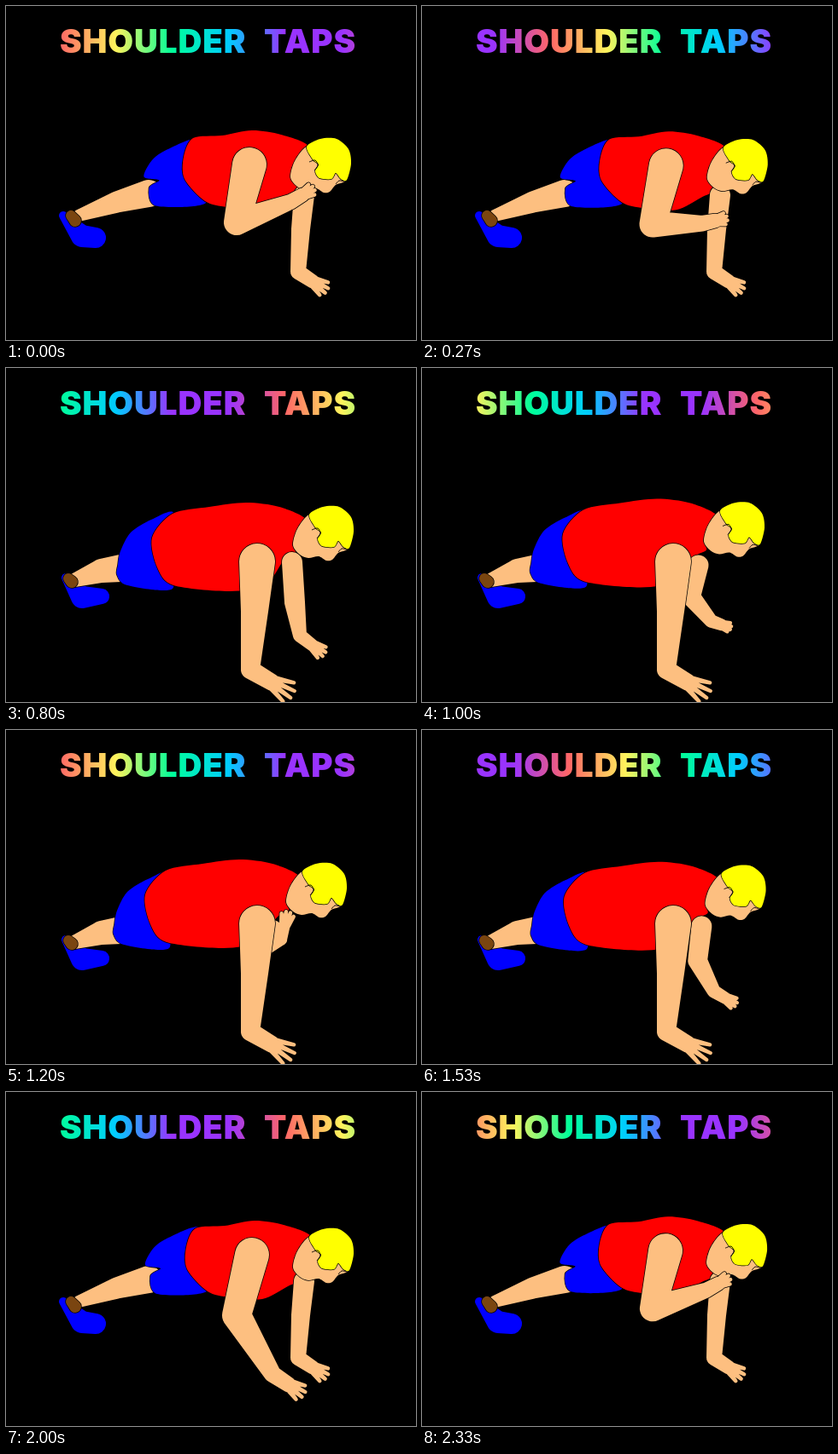
Animation of 480x392 px, one loop 2.39 s. Source, as an HTML page with a canvas:

```html
<!DOCTYPE html>
<html lang="en">
<head>
<meta charset="utf-8">
<title>Shoulder Taps</title>
<style>
html, body { margin: 0; width: 100%; height: 100%; overflow: hidden; background: #000; }
canvas { display: block; }
</style>
</head>
<body>
<canvas id="stage" width="480" height="392"></canvas>
<script>
const ctx = document.getElementById('stage').getContext('2d');
const LOOP = 2390, STEPS = 36, RAINBOW_WIDTH = 397;
const RAINBOW = ['#ff6666', '#fff35c', '#00ff99', '#00ccff', '#9933ff', '#9933ff'];
const SKIN = '#fdbf80', RED = '#f00', BLUE = '#00f', YELLOW = '#ff0', BROWN = '#7a4510';

// Outlines as [x, y], limbs as joints [x, y, radius] ending in a fingertip [x, y].
const torso = {
  open: [[222,160], [256,157], [291,151], [325,156], [357,170], [337,196], [352,216], [330,228], [300,243], [262,241], [236,234], [212,208], [211,182]],
  planted: [[195,169], [238,161], [281,156], [320,161], [352,177], [336,203], [339,216], [325,224], [304,252], [262,260], [196,253], [177,232], [171,197]]
};
const shorts = {
  open: [[226,159], [190,171], [172,184], [163,203], [181,207], [169,216], [177,237], [235,234], [222,200]],
  planted: [[196,169], [170,177], [146,192], [134,214], [131,230], [130,242], [142,254], [195,258], [186,215]]
};
const leg = {
  open: [[85,246,7], [130,230,12.5], [167,220,16]],
  planted: [[80,249,8], [112,238,14], [134,235,16]]
};
const shoe = {
  open: [[67,246,5], [89,270,13], [105,272,12]],
  planted: [[70,246,5], [89,269,13], [112,268,9]]
};
const sock = { open: [[76,246,6], [81,252,7]], planted: [[73,247,6], [77,251,7]] };
const nearArm = {
  open: [[288,191,20], [270,262,17], [312,331,10], [350,356]],
  planted: [[294,227,21], [291,285,16], [286,354,11], [337,384]],
  tap: [[285,186,20], [270,254,15], [333,230,9], [362,213]]
};
const farArm = {
  open: [[349,222,12], [345,262,11], [342,312,9], [377,335]],
  planted: [[335,228,12], [338,275,12], [344,314,8], [374,337]],
  tap: [[312,235,12], [292,262,10], [322,246,7], [331,212]]
};
const face = [[355,170], [373,175], [395,188], [401,209], [389,215], [382,223], [375,224], [366,219], [354,221], [344,217], [336,206], [341,187]];
const hair = [[355,170], [371,161], [390,161], [404,173], [407,190], [402,209], [395,208], [389,201], [384,208], [370,207], [365,199], [369,191], [362,185]];
const ear = [[358,188], [365,186], [368,192], [364,198]];
const brow = [[389,214], [393,210], [399,211]];

const ramp = (v, from, to) => Math.min(1, Math.max(0, (v - from) / (to - from)));
const easeOut = t => 1 - (1 - t) ** 2;
const mix = (a, b, t) => Array.isArray(a) ? a.map((v, i) => mix(v, b[i], t)) : a + (b - a) * t;
const move = (points, dx, dy) => points.map(([x, y]) => [x + dx, y + dy]);

function paint(path, color) {
  if (color) {
    ctx.lineWidth = 1.5;
    ctx.stroke(path);
    ctx.fillStyle = color;
    ctx.fill(path);
  } else {
    ctx.lineWidth = 0.9;
    ctx.stroke(path);
  }
}

function curve(points, closed) {
  const path = new Path2D(), n = points.length;
  const at = i => points[closed ? (i + n) % n : Math.min(n - 1, Math.max(0, i))];
  path.moveTo(...points[0]);
  for (let i = 0; i < n - !closed; i++) {
    const [a, b, c, d] = [-1, 0, 1, 2].map(k => at(i + k));
    path.bezierCurveTo(b[0] + (c[0] - a[0]) / 7, b[1] + (c[1] - a[1]) / 7,
      c[0] - (d[0] - b[0]) / 7, c[1] - (d[1] - b[1]) / 7, ...c);
  }
  return path;
}

function addBone(path, [x1, y1, r1], [x2, y2, r2]) {
  const angle = Math.atan2(y2 - y1, x2 - x1);
  const side = Math.acos(Math.max(-1, Math.min(1, (r1 - r2) / Math.hypot(x2 - x1, y2 - y1))));
  const bone = new Path2D();
  bone.arc(x1, y1, r1, angle + side, angle - side + 2 * Math.PI);
  bone.arc(x2, y2, r2, angle - side, angle + side);
  bone.closePath();
  path.addPath(bone);
}

function limb(joints) {
  const path = new Path2D();
  for (let i = 1; i < joints.length; i++) addBone(path, joints[i - 1], joints[i]);
  return path;
}

function arm([shoulder, elbow, wrist, tip]) {
  const path = limb([shoulder, elbow, wrist]);
  const [x, y, r] = wrist;
  const angle = Math.atan2(tip[1] - y, tip[0] - x), reach = Math.hypot(tip[0] - x, tip[1] - y);
  const along = (turn, length, radius) =>
    [x + length * Math.cos(angle + turn), y + length * Math.sin(angle + turn), radius];
  addBone(path, wrist, along(0, reach * 0.5, r * 0.9));
  for (let finger = -1.5; finger <= 1.5; finger++) {
    const length = reach * (1.04 - 0.07 * Math.abs(finger));
    addBone(path, along(finger * 0.12, reach * 0.5, 3.5), along(finger * 0.16, length - 2, 2.2));
  }
  return path;
}

function drawTitle(step) {
  const left = 62 + RAINBOW_WIDTH * (step % 18 / 18 - 1);
  const rainbow = ctx.createLinearGradient(left, 0, left + 2 * RAINBOW_WIDTH, 0);
  for (let i = 0; i <= 12; i++) rainbow.addColorStop(i / 12, RAINBOW[i % 6]);
  ctx.fillStyle = rainbow;
  ctx.font = '900 38.5px Inter, sans-serif';
  ctx.letterSpacing = '0.9px';
  ctx.fillText('SHOULDER', 63, 55);
  ctx.fillText('TAPS', 302, 55);
}

// Phase runs from 0 (far hand taps) to 18 (near hand taps).
function drawFigure(phase) {
  const stance = ramp(phase, 11.5, 6.5);
  const landed = ramp(phase, 11.5, 10.5);
  const nearTap = easeOut(ramp(phase, 11.5, 17.5));
  const farTap = ramp(phase, 6.5, 0.5);
  const sway = 15 * Math.sin(Math.PI * stance) ** 2;
  const dx = -3 * nearTap - 8 * easeOut(farTap);
  const dy = 2 * stance - 5 * nearTap - 6 * easeOut(farTap);

  // The upper body sways forward while feet and planted hands stay.
  const lean = points => points.map(([x, y, r]) =>
    [x + sway * ramp(x, 150, 390) * ramp(y, 320, 220), y, r]);
  const outline = (points, color) =>
    paint(curve(lean(points).map(([x, y]) => [x, y]), Boolean(color)), color);
  const stand = part => mix(part.open, part.planted, stance);

  const near = [...stand(nearArm).slice(0, 2), ...mix(nearArm.open, nearArm.planted, landed).slice(2)];
  const far = stand(farArm).map((joint, i) => mix(joint, farArm.tap[i], i < 2 ? farTap : farTap ** 2));

  paint(limb(stand(shoe)), BLUE);
  paint(limb(stand(leg)), SKIN);
  paint(limb(stand(sock)), BROWN);
  outline(move(stand(shorts), dx / 2, dy / 2), BLUE);
  outline(move(stand(torso), dx, dy), RED);
  paint(arm(lean(far)), SKIN);
  outline(move(face, dx, dy), SKIN);
  outline(move(hair, dx, dy), YELLOW);
  outline(move(ear, dx, dy));
  outline(move(brow, dx, dy));
  paint(arm(lean(mix(near, nearArm.tap, nearTap))), SKIN);
}

function frame() {
  const step = Math.floor(performance.now() % LOOP / LOOP * STEPS);
  const distance = Math.abs(step - 18.5);
  ctx.fillStyle = '#000';
  ctx.fillRect(0, 0, 480, 392);
  drawTitle(step);
  drawFigure(Math.min(distance, STEPS - distance));
  requestAnimationFrame(frame);
}
frame();
</script>
</body>
</html>
```
